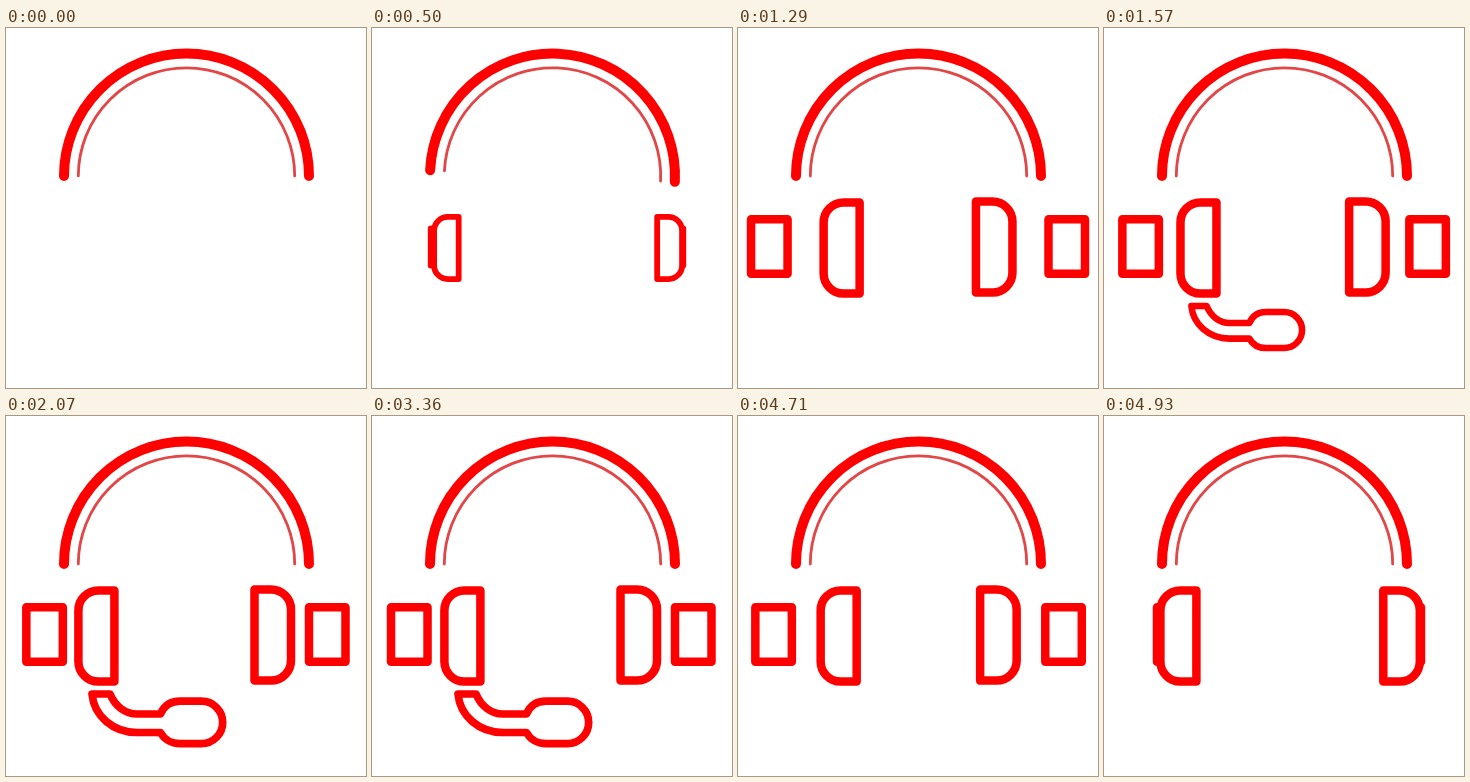
An HTML page that plays this animation: 360x360 px, repeating every 5 s.

```html
<!DOCTYPE html>
<html lang="en">
<head>
<meta charset="utf-8">
<title>Headset</title>
<style>
  html, body { margin: 0; height: 100%; overflow: hidden; background: #fff; }
  svg { display: block; width: 100vw; height: 100vh; }
  path { fill: #fff; stroke: #f00; stroke-width: 8.5; stroke-linejoin: round; stroke-linecap: round; }
  #band path { fill: none; stroke-width: 10; }
  #band .inner { stroke: #e24646; stroke-width: 2.8; }
  #mic path { stroke-width: 7.7; }
</style>
</head>
<body>
<svg viewBox="0 0 360 360">
  <g id="band">
    <path d="M58 148a122.5 122.5 0 0 1 245 0"/>
    <path class="inner" d="M72.3 148a108.2 108.2 0 0 1 216.4 0"/>
  </g>
  <g id="mic"><path d="M86 278H104C109 290 119 298 131 298H154.5C158 290 165 285.2 174 285.2H195.5a21.2 21.2 0 0 1 0 42.4H174C165 327.6 158 323 154.5 316.5H131C107 316.5 88 300 86 278Z"/></g>
  <g id="boxL"><path d="M0 191.2h36.5v54.6H0Z"/></g>
  <g id="boxR"><path d="M0 191.2h-36.5v54.6H0Z"/></g>
  <g id="cupL"><path d="M36 174.5v91H20a20 20 0 0 1-20-20v-51a20 20 0 0 1 20-20Z"/></g>
  <g id="cupR"><path d="M-36.5 174.5v91H-20a20 20 0 0 0 20-20v-51a20 20 0 0 0-20-20Z"/></g>
</svg>
<script>
const LOOP = 5000, SWING = 1290;
const BOX_START = 700, CUP_START = 790;
const part = Object.fromEntries([...document.querySelectorAll('g')].map(g => [g.id, g]));

// Smooth 0 to 1 ramp between two times.
function ramp(t, from, to) {
  const u = Math.min(1, Math.max(0, (t - from) / (to - from)));
  return u * u * (3 - 2 * u);
}

// Open past the resting place, settle, swing out again, then close.
function slide(t, start, closed, peak, rest) {
  return closed
    + (peak - closed) * (ramp(t, start, 1340) - ramp(t, 4650, 4930))
    + (rest - peak) * (ramp(t, 1340, 1700) - ramp(t, 4400, 4650));
}

function place(group, x, y, scale, cx, cy) {
  group.setAttribute('transform',
    `translate(${x + cx} ${y + cy}) scale(${scale}) translate(${-cx} ${-cy})`);
  group.setAttribute('visibility', scale > 0.001 ? 'visible' : 'hidden');
}

function draw(t) {
  const ear = ramp(t, 320, 610);
  const mic = ramp(t, 1330, 1650) - ramp(t, 4430, 4680);
  const tilt = t < SWING ? 4.2 * Math.sin(2 * Math.PI * t / SWING) : 0;
  const drift = (t - 1700) / 1000;
  part.band.setAttribute('transform', `rotate(${tilt} 180.5 148)`);
  place(part.boxL, slide(t, BOX_START, 53, 12.4, 20.7 - drift), 0, ear, 18, 220);
  place(part.boxR, slide(t, BOX_START, 317, 347.5, 339.5), 0, ear, -18, 220);
  place(part.cupL, slide(t, CUP_START, 56.4, 86.3, 72.4), 0, ear, 18, 220);
  place(part.cupR, slide(t, CUP_START, 315.8, 273.5, 285), slide(t, CUP_START, 0, -1, -1), ear, -18, 220);
  place(part.mic, 0, 0, mic, 95, 278);
}

const start = performance.now();
function frame() {
  draw((performance.now() - start) % LOOP);
  requestAnimationFrame(frame);
}
frame();
</script>
</body>
</html>
```
